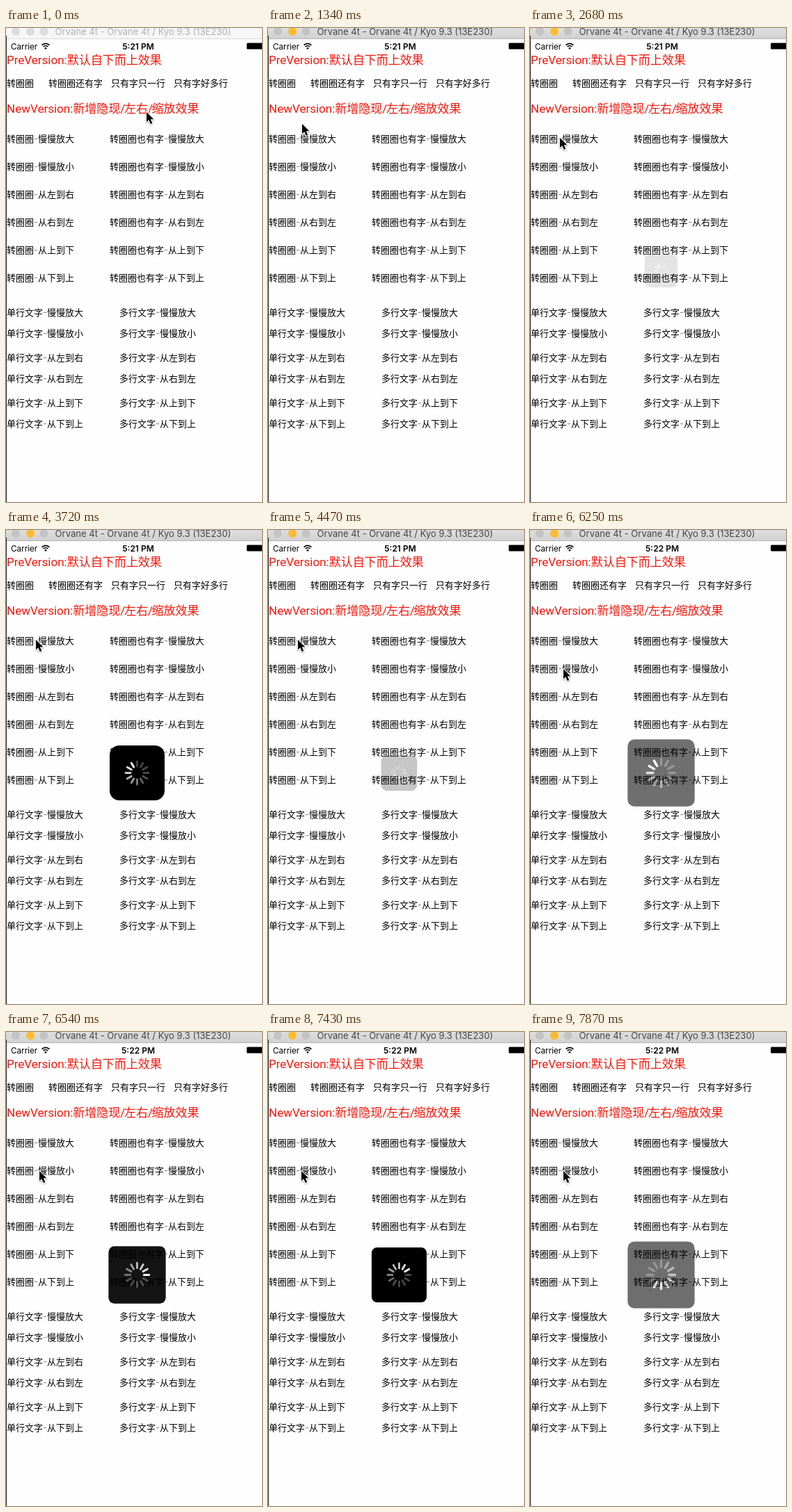
An HTML page that plays this animation: 368 px wide and 682 px high, repeating every 8 s.

```html
<!DOCTYPE html>
<html lang="zh-CN">
<head>
<meta charset="utf-8">
<title>HUD demo</title>
<style>
  html, body { margin: 0; width: 100%; height: 100%; overflow: hidden; background: #fefefe; }
  svg { display: block; width: 368px; height: 682px; }
  text { font: 13px Inter, "Noto Sans CJK SC", "Noto Sans CJK", sans-serif; white-space: pre; }
  .sep { fill: #888; }
  .head { font: 17px Roboto, "Noto Sans CJK SC", "Noto Sans CJK", sans-serif; fill: #f5170b; }
  .head .sep { fill: inherit; letter-spacing: -1.4px; }
  .mid { text-anchor: middle; }
  #title { font-size: 13.05px; }
  #carrier { font-size: 11.7px; }
  #clock { font-size: 12px; font-weight: 600; }
  #cursor { paint-order: stroke; filter: drop-shadow(0 1px 1px #0005); }
</style>
</head>
<body>
<svg viewBox="0 0 368 682">
  <defs>
    <linearGradient id="metal" x2="0" y2="1">
      <stop stop-color="#dedede"/><stop offset="1" stop-color="#d1d1d1"/>
    </linearGradient>
  </defs>
  <rect width="368" height="682" fill="#fefefe"/>
  <rect id="bar" width="368" height="15"/>
  <rect id="rule" y="15" width="368" height="1"/>
  <g id="lights">
    <circle cx="14" cy="5" r="6"/><circle cx="35" cy="5" r="6"/><circle cx="54.5" cy="5" r="6"/>
  </g>
  <text id="title" class="mid" x="197" y="10">Orvane 4t - Orvane 4t / Kyo 9.3 (13E230)</text>
  <rect y="11" width="1" height="671" fill="#1c1c24"/>

  <text id="carrier" x="7" y="30.5">Carrier</text>
  <g fill="none" stroke="#000" stroke-width="1.7">
    <path d="M51.6 24.6A7.6 7.6 0 0 1 62.4 24.6"/>
    <path d="M53.7 26.9A4.7 4.7 0 0 1 60.3 26.9"/>
    <path d="M57 31 55.1 28.9A2.7 2.7 0 0 1 58.9 28.9Z" fill="#000" stroke="none"/>
  </g>
  <text id="clock" class="mid" x="190" y="30.5"></text>
  <rect x="346" y="21.5" width="25" height="9" rx="1.5"/>

  <g id="labels"></g>
  <g id="hud">
    <rect id="box" x="-39.5" y="-39.5" width="79" height="79"/>
    <g id="spokes" stroke="#fff" stroke-width="2.8" stroke-linecap="round"></g>
  </g>
  <path id="cursor" d="M0 0V14.2L3.3 11.2 5.8 17 8.3 15.9 5.8 10.3H10.3Z"
    fill="#000" stroke="#fff" stroke-width="2" stroke-linejoin="round"/>
</svg>
<script>
const LOOP = 8000, STEP = 148.5;
const NS = 'http://www.w3.org/2000/svg';
const $ = id => document.getElementById(id);

function add(parent, tag, attrs, text = '') {
  const el = document.createElementNS(NS, tag);
  for (const key in attrs) el.setAttribute(key, attrs[key]);
  el.textContent = text;
  parent.append(el);
  return el;
}

// A line of text whose dashes and slashes get their own style
function line(x, y, text, name) {
  const el = add($('labels'), 'text', { x, y, class: name });
  for (const part of text.split(/([-/])/)) {
    add(el, 'tspan', /^[-/]$/.test(part) ? { class: 'sep' } : {}, part);
  }
}

// Both take the vertical middle of the line
const label = (x, y, text) => line(x, y + 4, text, 'label');
const heading = (y, text) => line(1, y + 6, text, 'head');

heading(46, 'PreVersion:默认自下而上效果');
heading(116, 'NewVersion:新增隐现/左右/缩放效果');
label(1, 80, '转圈圈');
label(61, 80, '转圈圈还有字');
label(151, 80, '只有字只一行');
label(241, 80, '只有字好多行');

const effects = ['慢慢放大', '慢慢放小', '从左到右', '从右到左', '从上到下', '从下到上'];
effects.forEach((name, i) => {
  const top = 160 + 40 * i;
  const low = 410 + 30 * i + 5 * (i >> 1);
  label(1, top, '转圈圈-' + name);
  label(149, top, '转圈圈也有字-' + name);
  label(1, low, '单行文字-' + name);
  label(163, low, '多行文字-' + name);
});

const spokes = Array.from({ length: 12 }, (_, i) =>
  add($('spokes'), 'line', { y1: -9.5, y2: -16.5, transform: `rotate(${i * 30})` }));

// Cursor stops: tick, x, y
const path = [
  [0, 202, 121], [1, 190, 140], [2, 150, 175], [3, 105, 197], [4, 75, 199],
  [5, 60, 185], [6, 52, 165], [7, 49, 148], [8, 49, 140], [9, 49, 138],
  [11, 47, 143], [12, 44, 153], [13, 43, 158],
  [34, 43, 166], [35, 44, 178], [36, 46, 190], [37, 48, 198], [38, 48, 200]
];

// Each HUD is visible for ticks first..last and scales from/to `scale`
const huds = [
  { first: 18, last: 31, show: 2470, hide: 3720, scale: .56, radius: 14, phase: 3 },
  { first: 40, last: 53, show: 5670, hide: 7390, scale: 1.5, radius: 8, phase: 9 }
];

function ease(t, start, duration = 1050) {
  const p = Math.min(1, Math.max(0, (t - start) / duration));
  return p * p * (3 - 2 * p);
}

function drawWindow(active) {
  $('bar').setAttribute('fill', active ? 'url(#metal)' : '#f6f6f6');
  $('rule').setAttribute('fill', active ? '#b5b5b5' : '#d8d8d8');
  $('title').setAttribute('fill', active ? '#444' : '#b0b0b0');
  const colors = active ? ['#c3c3c3', '#fdbc2f', '#c3c3c3'] : ['#dcdcdc', '#dcdcdc', '#dcdcdc'];
  [...$('lights').children].forEach((c, i) => c.setAttribute('fill', colors[i]));
}

function drawHud(tick, t) {
  const hud = huds.find(h => tick >= h.first && tick <= h.last);
  $('hud').style.display = hud ? '' : 'none';
  if (!hud) return;
  const level = ease(t, hud.show) - ease(t, hud.hide);
  const scale = hud.scale + (1 - hud.scale) * level;
  $('hud').setAttribute('transform', `translate(188.5 349.5) scale(${scale})`);
  $('hud').setAttribute('opacity', level);
  $('box').setAttribute('rx', hud.radius);
  const head = Math.floor(t * .012) + hud.phase;
  spokes.forEach((s, i) => {
    const age = (head - i) % 12;
    s.setAttribute('opacity', Math.max(.28, 1 - age * .1));
  });
}

function draw(now) {
  const tick = Math.floor((now % LOOP) / STEP);
  const [, x, y] = path.findLast(stop => stop[0] <= tick);
  $('cursor').setAttribute('transform', `translate(${x} ${y})`);
  $('clock').textContent = tick < 42 ? '5:21 PM' : '5:22 PM';
  drawWindow(tick >= 9);
  drawHud(tick, tick * STEP);
}

const began = performance.now();
function loop() {
  draw(performance.now() - began);
  requestAnimationFrame(loop);
}
loop();
</script>
</body>
</html>
```
